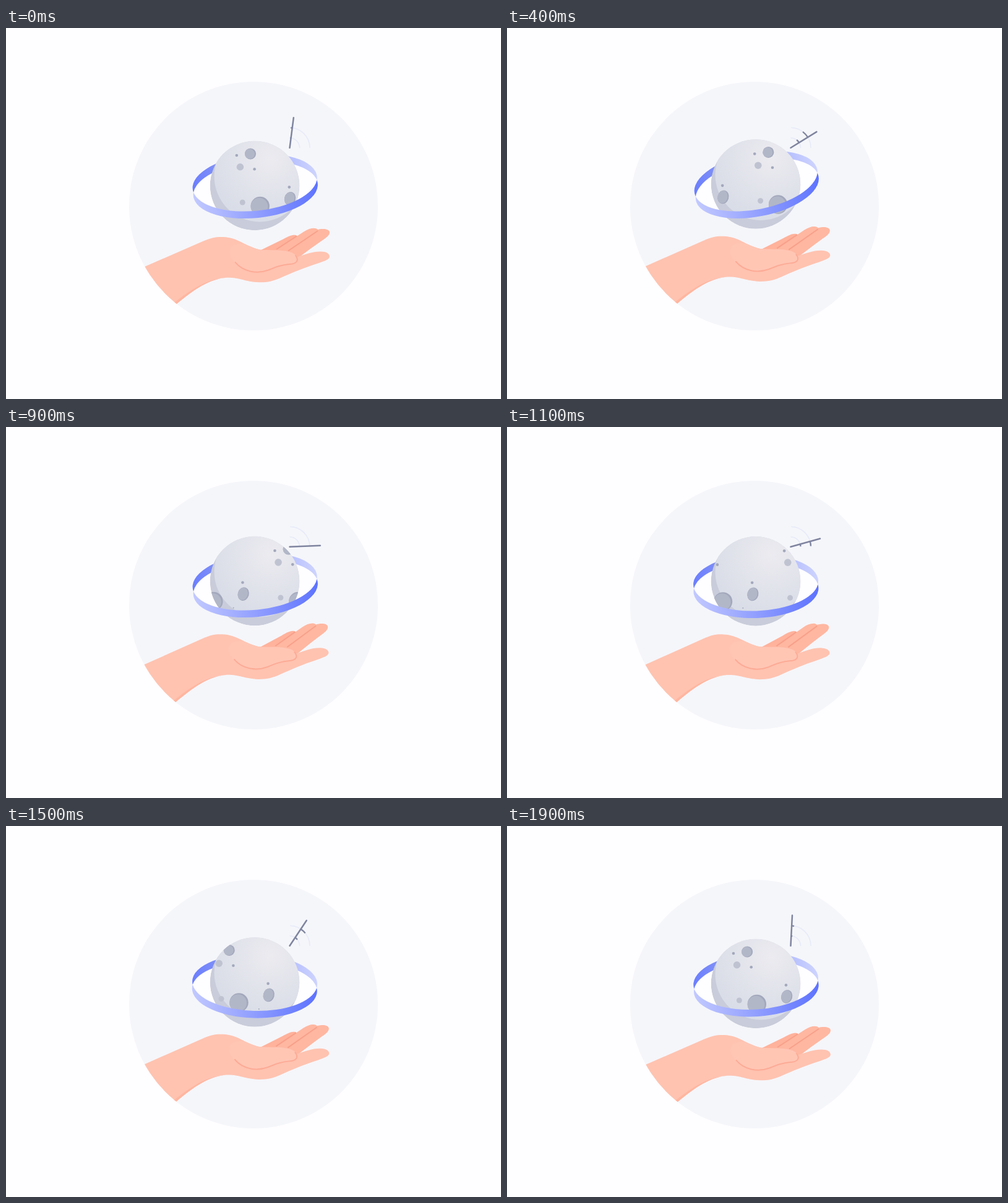
An HTML page that plays this animation: 800 by 600 pixels, repeating every 2 s.

```html
<!DOCTYPE html>
<html lang="en">
<head>
<meta charset="utf-8">
<title>Planet above a hand</title>
<style>
  html, body { margin: 0; width: 100%; height: 100%; overflow: hidden; background: #fefdff; }
  svg { display: block; width: 100%; height: 100%; }
</style>
</head>
<body>
<svg viewBox="0 0 800 600">
  <defs>
    <clipPath id="disc"><circle cx="400" cy="288" r="201"/></clipPath>
    <clipPath id="ball"><circle cx="402" cy="255" r="72.3"/></clipPath>
    <radialGradient id="light" gradientUnits="userSpaceOnUse" cx="427" cy="212" r="100">
      <stop offset="0" stop-color="#ecebf0"/>
      <stop offset="1" stop-color="#d9dde7"/>
    </radialGradient>
    <linearGradient id="backFill">
      <stop offset="0" stop-color="#6b7eff"/>
      <stop offset=".2" stop-color="#7f8ff6"/>
      <stop offset=".75" stop-color="#b2bbff"/>
      <stop offset="1" stop-color="#ced4fd"/>
    </linearGradient>
    <linearGradient id="frontFill">
      <stop offset="0" stop-color="#c2c9ff"/>
      <stop offset="1" stop-color="#5d72ff"/>
    </linearGradient>
    <g id="craters">
      <g fill="#a3a8bc">
        <circle cx="395" cy="203.5" r="9"/>
        <circle cx="410.7" cy="288" r="15.2"/>
        <ellipse cx="459" cy="276" rx="9" ry="11" transform="rotate(15 459 276)"/>
        <circle cx="372.8" cy="206" r="2.3"/>
        <circle cx="401.6" cy="228.3" r="2.3"/>
        <circle cx="457.8" cy="257.4" r="2.3"/>
        <circle cx="443" cy="298.5" r="1"/>
      </g>
      <g fill="#b2b7c8">
        <circle cx="394" cy="203.6" r="8"/>
        <circle cx="409.4" cy="288.7" r="13.8"/>
        <ellipse cx="458.1" cy="275.7" rx="8" ry="10.2" transform="rotate(15 458 276)"/>
      </g>
      <g fill="#bfc3d1">
        <circle cx="378.4" cy="224.8" r="5.8"/>
        <circle cx="382.2" cy="282" r="4.5"/>
      </g>
    </g>
  </defs>

  <rect width="800" height="600" fill="#fefdff"/>
  <circle cx="400" cy="288" r="201" fill="#f5f6fa"/>

  <g clip-path="url(#disc)">
    <g id="hand">
      <g id="fingers">
        <path fill="#ffb29c" d="M408 361L448 341.500C458 336 466 333 470.500 336L470 350L440 372Z"/>
        <path fill="#ffb7a1" d="M434 360L482 329C491 323.500 500 322 504 326C512 324 522 324.500 523 330C523.500 335 518 339 512 343C500 351 487 361 472 372L440 374Z"/>
        <path fill="none" stroke="#f8a08a" stroke-width="2" d="M437 358L470 336.500M456 360.500L504 328"/>
      </g>
      <path fill="#ffc3b0" d="M190 400L224 386L318 345C332 339 340 337.500 351 338C376 339 386 353 410 358.500C432 361 456 360 470 370.500C484 366 495 361.500 508 361.500C518 361.500 523 365 523 370C522 375 514 377 506 380C478 389 462 396 444 404C432 409.500 422 411.500 409 411.300C384 410 378 403 356 403.700C328 405 304 423 276 446L230 480L180 460Z"/>
      <path fill="#ffb6a0" d="M262 452C290 430 318 406 358 403.500C328 406 304 423 276 446L262 458Z"/>
      <path fill="#ffc6b4" d="M366 352C384 344 392 354 410 358.500C430 360 444 358 460 362.500C470 366 474 374 469 379.500C462 384 448 382 436 387C421 394 402 397 387 391C370 385 352 364 366 352Z"/>
      <path fill="none" stroke="#fcab96" stroke-width="2" stroke-linecap="round" d="M370.500 379C383 394 405 398.500 424 391.500C436 386.500 445 383 458 382C470 381.500 474 376 468 368"/>
    </g>
  </g>

  <g id="back">
    <path id="hole" fill="#fefdff"/>
    <path id="rear" fill="url(#backFill)"/>
  </g>
  <g id="planet">
    <g clip-path="url(#ball)">
      <circle cx="402" cy="255" r="72.300" fill="#c9ccda"/>
      <circle cx="410" cy="240" r="73.500" fill="url(#light)"/>
      <use id="near" href="#craters"/>
      <use id="far" href="#craters"/>
    </g>
  </g>
  <g id="front"><path id="band" fill="url(#frontFill)"/></g>

  <g fill="none" stroke-linecap="round">
    <path id="waves" stroke="#e7eaf8" stroke-width="1.600"/>
    <path id="trail" stroke="#7f859f" stroke-width="2.300" stroke-linecap="butt"/>
    <path id="mast" stroke="#7f849f" stroke-width="2.500"/>
  </g>
</svg>
<script>
const LOOP = 2000, STEP = 100;
const SPAN = 137;                       // width of one repeat of the crater pattern
const BASE = { x: 458.5, y: 193.8 };    // foot of the mast
const RADII = [16, 32.5];
const $ = id => document.getElementById(id);
const set = (id, name, value) => $(id).setAttribute(name, value);
const wave = (t, peak) => Math.cos(2 * Math.PI * (t - peak) / LOOP);

// Ribbon between two equal ellipses, shifted along the ring's axis
function buildRing() {
  const a = 101, b = 45.5, h = 5.8, x = a * Math.sqrt(1 - (h / b) ** 2);
  const arc = (large, sweep, end) => `A${a} ${b} 0 ${large} ${sweep} ${end} 0`;
  const start = `M${-x} 0`;
  set('rear', 'd', start + arc(1, 1, x) + arc(0, 0, -x) + 'Z');
  set('band', 'd', start + arc(1, 0, x) + arc(0, 1, -x) + 'Z');
  set('hole', 'd', start + arc(0, 1, x) + arc(0, 1, -x) + 'Z');
}

// Mast angle clockwise from vertical: linear swings with a rest at each end
function mastAngle(t) {
  const low = 2.9, high = 87.7, p = (t + 35 + LOOP) % LOOP;
  const mix = p < 667 ? p / 667 : p < 1005 ? 1 : Math.max(0, 1 - (p - 1005) / 830);
  return low + (high - low) * mix;
}

function polar(r, deg) {
  const q = deg * Math.PI / 180;
  return `${BASE.x + r * Math.sin(q)} ${BASE.y - r * Math.cos(q)}`;
}

function arcs(from, to) {
  const sweep = to > from ? 1 : 0;
  return RADII.map(r => `M${polar(r, from)}A${r} ${r} 0 0 ${sweep} ${polar(r, to)}`).join('');
}

function draw(t) {
  const bob = wave(t, -50), lift = (1 - bob) / 2;
  set('planet', 'transform', `translate(0 ${3 * bob - 3})`);
  set('hand', 'transform', `rotate(${-0.6 * lift} 90 513)`);
  set('fingers', 'transform', `rotate(${-1.7 * lift} 430 362)`);

  const shift = SPAN * t / LOOP;
  set('near', 'x', shift);
  set('far', 'x', shift - SPAN);

  const sway = wave(t, 450);
  const ring = `translate(${402.6 + 0.7 * sway} ${256.4 - 2.9 * sway}) rotate(${-4.8 - 6.4 * sway})`;
  set('back', 'transform', ring);
  set('front', 'transform', ring);

  const now = mastAngle(t), past = mastAngle(t - 167);
  set('mast', 'd', `M${BASE.x} ${BASE.y}L${polar(49.3, now)}`);
  set('trail', 'd', Math.abs(now - past) > 0.1 ? arcs(past, now) : '');
}

buildRing();
set('waves', 'd', arcs(2, 89));

function tick() {
  const time = performance.now() + 10;
  draw(Math.floor(time / STEP) * STEP % LOOP);
  requestAnimationFrame(tick);
}
tick();
</script>
</body>
</html>
```
